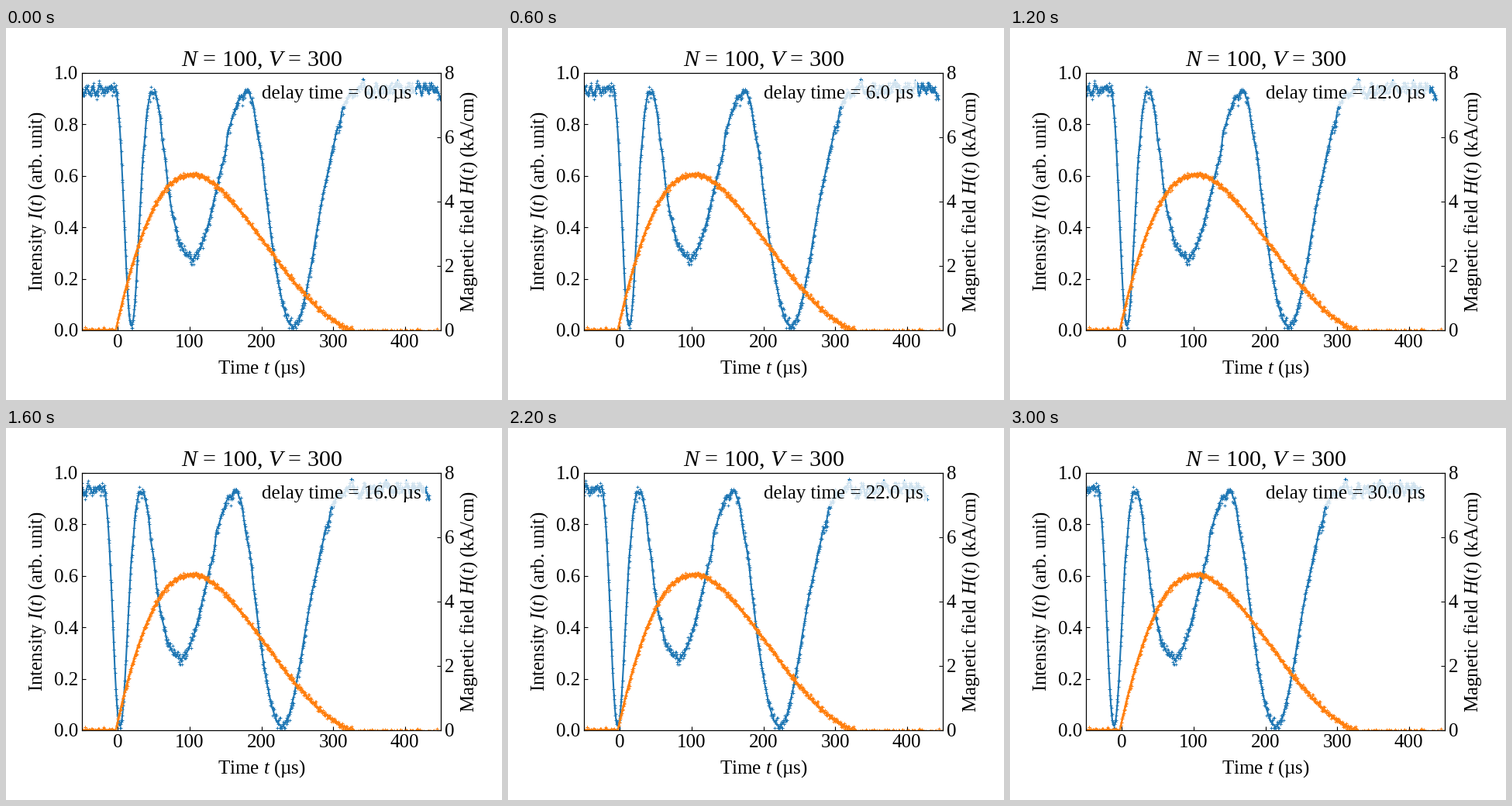
Animation of 640 by 480 pixels, one loop 3.1 s. Source, as a matplotlib script:

```python
import numpy as np
import matplotlib.pyplot as plt
from matplotlib.animation import FuncAnimation

plt.rcParams.update({
    "font.family": "Liberation Serif",
    "font.size": 18,
    "mathtext.fontset": "custom",
    "mathtext.rm": "Liberation Serif",
    "mathtext.it": "Liberation Serif:italic",
    "xtick.direction": "in",
    "ytick.direction": "in",
})

W, H, DPI = 640, 480, 100
FRAMES, INTERVAL = 31, 100
BLUE, ORANGE = "tab:blue", "tab:orange"
START, END = -3, 328  # field pulse, in µs

# Phase of the light in quarter turns: (time in µs, phase)
PHASE = [(START, 0), (19, 1), (32, 1.54), (49, 2), (70, 2.44), (102, 2.635),
         (139, 2.44), (177, 2), (214, 1.42), (244, 1), (274, .6), (335, 0)]


def hermite(t, knots):
    """Smooth curve through the knots, flat outside them."""
    x, y = np.array(knots, float).T
    m = np.gradient(y, x)
    t = np.clip(t, x[0], x[-1])
    i = np.clip(np.searchsorted(x, t, side="right") - 1, 0, len(x) - 2)
    h = x[i + 1] - x[i]
    s = (t - x[i]) / h
    return ((1 + 2 * s) * (1 - s) ** 2 * y[i] + s * (1 - s) ** 2 * h * m[i]
            + s * s * (3 - 2 * s) * y[i + 1] + s * s * (s - 1) * h * m[i + 1])


def smooth(y, sigma):
    k = np.arange(-4 * sigma, 4 * sigma + 1)
    g = np.exp(-.5 * (k / sigma) ** 2)
    return np.convolve(np.pad(y, 4 * sigma, mode="edge"), g / g.sum(), "valid")


def quantise(y, step):
    return np.round(y / step) * step


def intensity(t):
    return .015 + .918 * np.cos(np.pi / 2 * hermite(t, PHASE)) ** 2


def field(t):
    """Damped half sine, slightly below zero once the pulse is over."""
    u = np.clip((t - START) / (END - START), 0, 1)
    pulse = np.sin(np.pi * u) * np.exp(-1.6 * u) * (1 - u) ** .3
    return np.where(t > END, -.06, 4.84 * pulse / pulse.max())


rng = np.random.default_rng(12)
t = np.arange(-120, 450.1, .5)

base = intensity(t)
drift = smooth(rng.normal(size=t.size), 3)
line_i = base + drift / drift.std() * (.003 + .010 * base ** 2)
dots_i = quantise(line_i + rng.normal(0, .011, t.size), .008)
dots_i = np.maximum(dots_i, .008)

line_h = field(t)
dots_h = quantise(line_h + rng.normal(0, .045, t.size), .03)

fig = plt.figure(figsize=(W / DPI, H / DPI), dpi=DPI, facecolor="white")
ax = fig.add_axes([98.2 / W, 90 / H, 462.8 / W, 332.4 / H])
ax2 = ax.twinx()

DOT = dict(ls="none", marker="+", ms=2.4, mew=.7)
dots, = ax.plot(t, dots_i, color=BLUE, **DOT)
line, = ax.plot(t, line_i, color=BLUE, lw=1.5)
ax2.plot(t, dots_h, color=ORANGE, **DOT)
ax2.plot(t, line_h, color=ORANGE, lw=1.8)

ax.set_title("$N$ = 100, $V$ = 300")
ax.set(xlim=(-50, 450), ylim=(0, 1), xticks=range(0, 401, 100))
ax2.set(ylim=(0, 8), yticks=range(0, 9, 2))
ax.set_xlabel("Time $t$ (µs)", labelpad=7)
ax.set_ylabel("Intensity $I(t)$ (arb. unit)", labelpad=6)
ax2.set_ylabel("Magnetic field $H(t)$ (kA/cm)", labelpad=4.5)
label = ax.text(200, .9, "", bbox=dict(fc="white", ec="none", alpha=.8))


def update(delay):
    dots.set_xdata(t - delay)
    line.set_xdata(t - delay)
    label.set_text(f"delay time = {delay:.1f} µs")
    return dots, line, label


anim = FuncAnimation(fig, update, frames=FRAMES, interval=INTERVAL,
                     init_func=lambda: update(0), repeat=True, repeat_delay=0)
plt.show()
```
